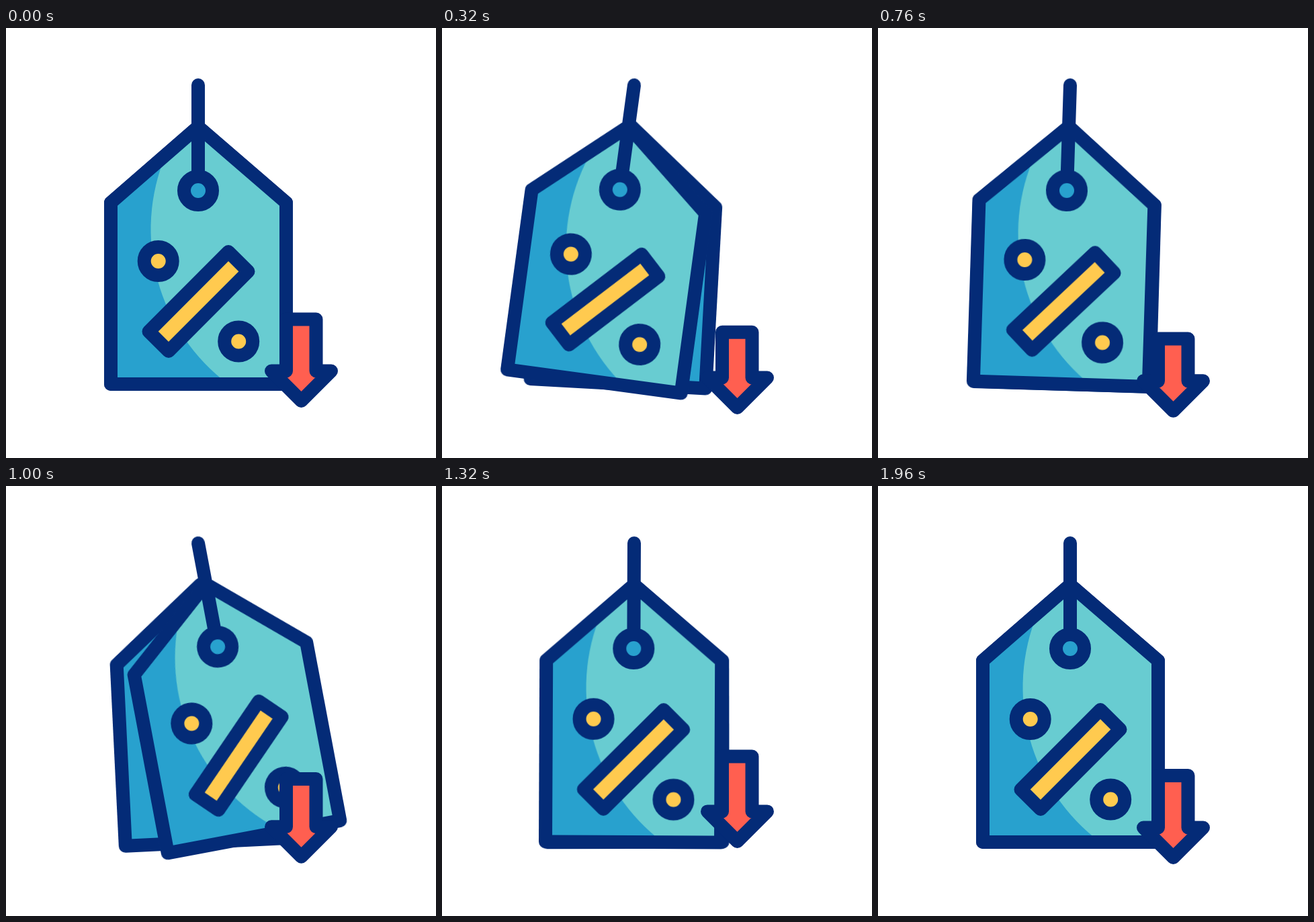
These frames come from a looping animation (640 by 640 pixels, 2 s). An HTML page:

```html
<!DOCTYPE html>
<html lang="en">
<head>
<meta charset="utf-8">
<title>Price tag</title>
<style>
  :root {
    --navy: #042b77;
    --blue: #28a1ce;
    --teal: #68ccd1;
    --yellow: #ffca4f;
    --red: #ff5f50;
  }
  html, body { margin: 0; height: 100%; overflow: hidden; background: #fff; }
  svg { display: block; width: 100vw; height: 100vh; }

  .line { stroke: var(--navy); stroke-width: 20; stroke-linejoin: round; stroke-linecap: round; }
  .blue { fill: var(--blue); }
  .teal { fill: var(--teal); }
  .yellow { fill: var(--yellow); }
  .red { fill: var(--red); }

  /* Both tags hang from the top of the string; segments ease in and out unless set below */
  .tag, .arrow { animation: 2s cubic-bezier(.365, 0, .635, 1) infinite; }
  .tag { transform-origin: 286px 85px; }
  .front { animation-name: swing; }
  .back { animation-name: follow; }
  .arrow { animation-name: drop; }

  /* Turning points ease in, crossings ease out */
  @keyframes swing {
    0%, 2% { transform: rotate(0deg); }
    26% { transform: rotate(12.25deg); animation-timing-function: cubic-bezier(.36, 0, .66, .48); }
    38% { transform: rotate(1.9deg); animation-timing-function: cubic-bezier(.33, .52, .64, 1); }
    52% { transform: rotate(-11deg); animation-timing-function: cubic-bezier(.36, 0, .66, .48); }
    66% { transform: rotate(.2deg); animation-timing-function: cubic-bezier(.33, .52, .64, 1); }
    73% { transform: rotate(5.1deg); }
    98%, 100% { transform: rotate(0deg); }
  }
  @keyframes follow {
    0%, 2% { transform: rotate(0deg); }
    26% { transform: rotate(5deg); animation-timing-function: cubic-bezier(.36, 0, .66, .48); }
    38% { transform: rotate(1.7deg); animation-timing-function: cubic-bezier(.33, .52, .64, 1); }
    52% { transform: rotate(-2.9deg); animation-timing-function: cubic-bezier(.36, 0, .66, .48); }
    66% { transform: rotate(-.1deg); animation-timing-function: cubic-bezier(.33, .52, .64, 1); }
    73% { transform: rotate(1deg); }
    98%, 100% { transform: rotate(0deg); }
  }

  /* The shaft shortens on the way down and stretches on the way up */
  @keyframes drop {
    0%, 100% {
      d: path("M417 433.5 L461.5 433.5 L461.5 510.5 L484 510.5 L439.5 555 L395 510.5 L417 510.5 Z");
      animation-timing-function: linear;
    }
    8% {
      d: path("M417 443.5 L461.5 443.5 L461.5 516.2 L484 516.2 L439.5 560.7 L395 516.2 L417 516.2 Z");
      animation-timing-function: linear;
    }
    16% {
      d: path("M417 452.7 L461.5 452.7 L461.5 520.5 L484 520.5 L439.5 565 L395 520.5 L417 520.5 Z");
      animation-timing-function: cubic-bezier(.33, .67, .67, 1);
    }
    35% {
      d: path("M417 464 L461.5 464 L461.5 526.3 L484 526.3 L439.5 570.8 L395 526.3 L417 526.3 Z");
    }
    67% {
      d: path("M417 402.4 L461.5 402.4 L461.5 484.3 L484 484.3 L439.5 528.8 L395 484.3 L417 484.3 Z");
      animation-timing-function: cubic-bezier(.33, 0, .67, .33);
    }
    82% {
      d: path("M417 411.5 L461.5 411.5 L461.5 492.3 L484 492.3 L439.5 536.8 L395 492.3 L417 492.3 Z");
      animation-timing-function: linear;
    }
  }
</style>
</head>
<body>
<svg viewBox="0 0 640 640">
  <defs>
    <path id="body" d="M286 147 L417 260 V530 H156 V260 Z"/>
  </defs>

  <g class="tag back">
    <use href="#body" class="line blue"/>
  </g>

  <g class="tag front">
    <use href="#body" class="blue"/>
    <path class="teal" d="M237.6 189 A288 288 0 0 0 330.7 530 H417 V260 L286 147 Z"/>
    <use href="#body" class="line" fill="none"/>
    <path class="line" d="M286 85 V220"/>
    <circle class="line blue" cx="286" cy="242" r="21"/>
    <circle class="line yellow" cx="226.7" cy="347" r="21"/>
    <circle class="line yellow" cx="346.2" cy="466.5" r="21"/>
    <path class="line yellow" d="M331 333 L360.5 362.3 L242 481 L212.5 451.7 Z"/>
  </g>

  <path class="line red arrow" d="M417 433.5 L461.5 433.5 L461.5 510.5 L484 510.5 L439.5 555 L395 510.5 L417 510.5 Z"/>
</svg>
</body>
</html>
```
